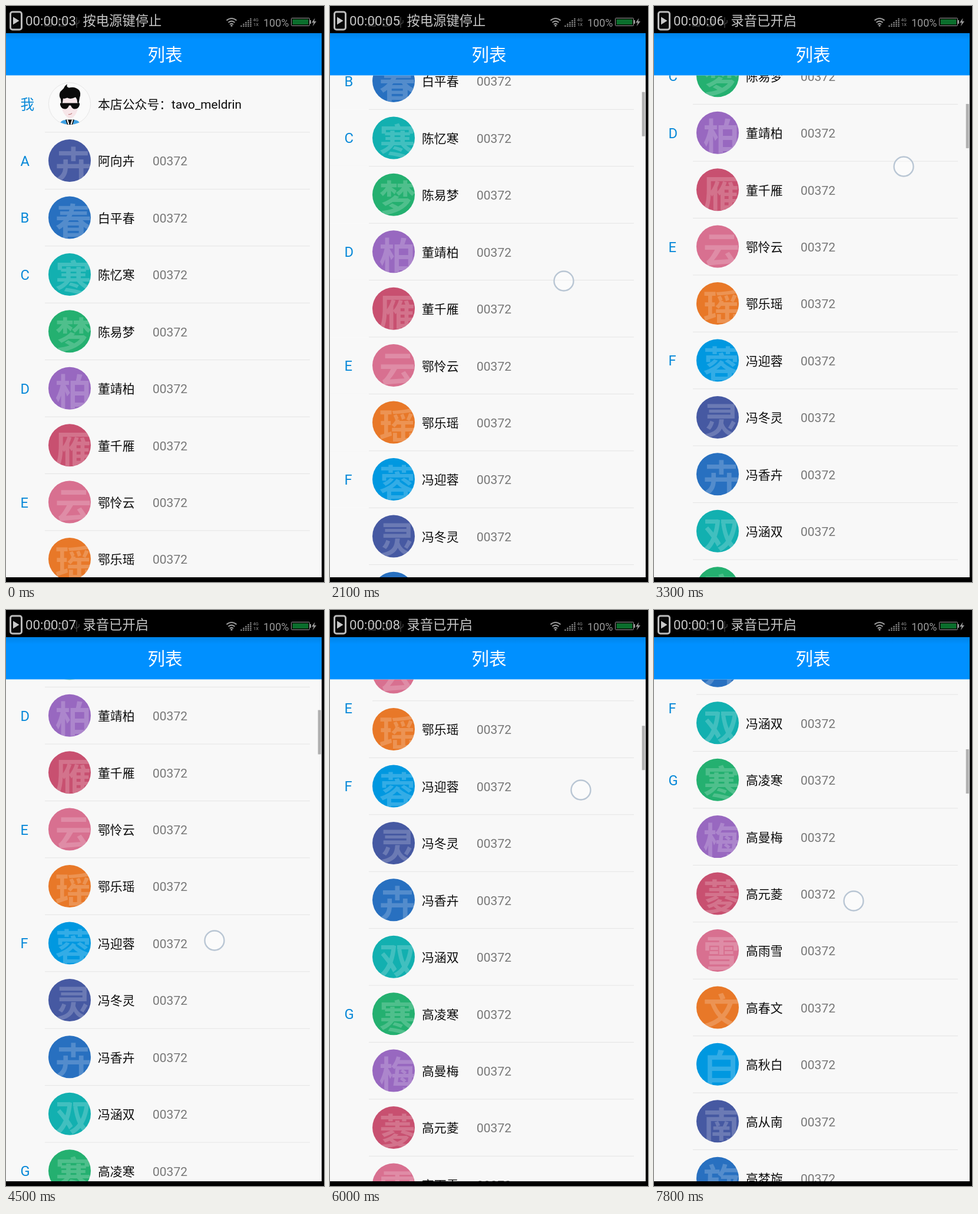
An HTML page for the animation above (8 s loop, 540 px wide and 976 px high).

```html
<!DOCTYPE html>
<html lang="zh-CN">
<head>
<meta charset="utf-8">
<title>列表</title>
<style>
  html, body { margin: 0; width: 100%; height: 100%; overflow: hidden; background: #000; }
  svg { display: block; width: 100vw; height: 100vh; }
  text { font-family: Roboto, "Noto Sans CJK SC", "Noto Sans CJK", sans-serif; white-space: pre; }
</style>
</head>
<body>
<svg id="stage" viewBox="0 0 540 976">
  <defs>
    <clipPath id="list"><rect y="117.5" width="536" height="850.5"/></clipPath>
    <clipPath id="disc"><circle r="36"/></clipPath>
    <linearGradient id="shade" x2="0" y2="1">
      <stop stop-color="#0084e8"/>
      <stop offset="1" stop-color="#0090ff"/>
    </linearGradient>
  </defs>
  <rect width="540" height="976" fill="#000"/>
  <rect y="117" width="536" height="851" fill="#f8f8f8"/>
  <g clip-path="url(#list)">
    <g id="rows"></g>
    <g id="letters"></g>
    <rect id="thumb" x="529.7" width="5.3" height="75" fill="#b2b2b2"/>
    <circle id="touch" r="16.5" fill="#fff" fill-opacity=".35" stroke="#b9c6d4" stroke-width="2.4"/>
  </g>
  <rect y="46" width="536" height="71.5" fill="#0090ff"/>
  <rect y="46" width="536" height="12" fill="url(#shade)"/>
  <text x="270" y="93" font-size="29.6" fill="#fff" text-anchor="middle">列表</text>

  <!-- dim icons behind the recorder label -->
  <g fill="none" stroke="#3c3c3c" stroke-width="1.5">
    <path d="M120 19V37M116 25v4l4 3M124 24v4l-4 3"/>
    <rect x="66" y="23" width="11" height="11"/>
    <rect x="90" y="23" width="11" height="11"/>
  </g>
  <!-- recorder -->
  <rect x="7.5" y="10" width="19" height="30" rx="3.5" fill="#080808" stroke="#bcbcbc" stroke-width="3"/>
  <path d="M12 18.5L22.5 25L12 31.5Z" fill="#c8c8c8"/>
  <g font-size="22.3" fill="#c6c6c6">
    <text id="clock" x="33" y="33"></text>
    <text id="hint" x="130.5" y="32.5"></text>
  </g>
  <!-- phone status -->
  <g fill="none" stroke="#9a9a9a" stroke-width="2">
    <path d="M374.5 24.5Q383 17.5 391.5 24.5M377.5 28Q383 23.3 388.5 28M380 31.2Q383 28.6 386 31.2"/>
    <path id="bars" stroke-width="2.2"/>
  </g>
  <circle cx="383" cy="33.3" r="1.6" fill="#9a9a9a"/>
  <g fill="#9a9a9a">
    <text x="419.5" y="25.5" font-size="7.5">4G</text>
    <text x="420" y="34" font-size="7.5">1X</text>
    <text x="437" y="34.5" font-size="18">100%</text>
    <path d="M516 24h2v6h-2zM524.5 20.5L519 28.2h3.6L520.6 34.5L527 26h-3.6z"/>
  </g>
  <rect x="484.5" y="20.5" width="31" height="13" rx="1" fill="#000" stroke="#9a9a9a"/>
  <rect x="486.5" y="22.5" width="27" height="9" fill="#0a6e2c"/>
</svg>
<script>
const LOOP = 8000, STEP = 300, ROW = 96.43, MID = 166;
const PHONE = "00372";
const TINTS = ["#4659a2", "#2870c0", "#12b0b0", "#24b070", "#9868c0", "#c85070", "#d87090", "#e87828", "#0098e0"];
const NAMES = ("阿向卉 白平春 陈忆寒 陈易梦 董靖柏 董千雁 鄂怜云 鄂乐瑶 冯迎蓉 冯冬灵 " +
  "冯香卉 冯涵双 高凌寒 高曼梅 高元菱 高雨雪 高春文 高秋白 高从南 高梦旋").split(" ");
// index letter and its first and last row
const GROUPS = [["我", 0, 0], ["A", 1, 1], ["B", 2, 2], ["C", 3, 4], ["D", 5, 6], ["E", 7, 8], ["F", 9, 12], ["G", 13, 20]];

const SCROLL = [[0, 0], [300, 8], [600, 36], [900, 75], [2100, 231.5], [3300, 433], [3600, 469],
  [4500, 469], [6000, 735], [6600, 848], [6900, 860], [7800, 1131.5]];
// each drag: time, x, y
const DRAGS = [
  [[300, 344, 694], [900, 362, 626], [2100, 397, 466], [3300, 424, 272], [3600, 429, 237]],
  [[4500, 354, 560], [6000, 426, 305], [6600, 446, 196]],
  [[6900, 300, 764], [7800, 339, 493]]
];

const $ = id => document.getElementById(id);

function add(parent, tag, attrs, text) {
  const el = document.createElementNS("http://www.w3.org/2000/svg", tag);
  for (const key in attrs) el.setAttribute(key, attrs[key]);
  if (text) el.textContent = text;
  parent.appendChild(el);
  return el;
}

function lerpKeys(keys, t, col = 1) {
  let i = 0;
  while (i < keys.length - 2 && t > keys[i + 1][0]) i++;
  const a = keys[i], b = keys[i + 1];
  const u = Math.min(1, Math.max(0, (t - a[0]) / (b[0] - a[0])));
  return a[col] + (b[col] - a[col]) * u;
}

function drawPortrait(g) {
  const shape = (d, fill) => add(g, "path", { d, fill });
  add(g, "circle", { r: 35.6, fill: "#fafafa", stroke: "#e6e6e6" });
  // suit, shirt and tie
  shape("M-15.5 32Q-14 28 -7 27.5H8Q15 28 16.5 32Q0 39 -15.5 32Z", "#3ca0e4");
  shape("M-7 27H8L5 35.5H-4Z", "#111");
  add(g, "path", { d: "M-4 27L-1.5 35M5 27L2.5 35", stroke: "#fff", "stroke-width": 2 });
  // head
  shape("M-13 -9H14V6Q13 17 6 23Q1 26 -4 23Q-12 17 -13 6Z", "#f7e6e9");
  shape("M-14 2L-15 -8Q-19 -13 -16 -20Q-12 -24 -10 -26Q-8 -31 -4 -33Q-6 -28 -1 -27Q9 -30 16 -23" +
    "Q20 -18 17 -10L15 2L13 -3Q13 -8 10 -11Q2 -7 -4 -10Q-9 -8 -11 -9L-12 -2Z", "#0b0b0b");
  shape("M-16 -1H17V2Q15 9 9 9Q4 9 2 3H-1Q-3 9 -8 9Q-14 9 -16 2Z", "#0b0b0b");
  add(g, "path", { d: "M-2 18Q2 18.5 4 16", fill: "none", stroke: "#b77", "stroke-width": 1.1 });
}

function drawRow(i) {
  const g = add($("rows"), "g", { transform: `translate(0 ${MID + i * ROW})` });
  const face = add(g, "g", { transform: "translate(108 -.4)" });
  const name = i ? NAMES[i - 1] : "本店公众号：tavo_meldrin";
  if (i) {
    add(face, "circle", { r: 36, fill: TINTS[(i - 1) % TINTS.length] });
    const clip = add(face, "g", { "clip-path": "url(#disc)" });
    add(clip, "text", { x: 6.5, y: 29.5, "font-size": 62, "font-weight": 700, fill: "#fff", "fill-opacity": .2, "text-anchor": "middle" }, name[2]);
    add(g, "text", { x: 249, y: 8, "font-size": 21, fill: "#777" }, PHONE);
  } else drawPortrait(face);
  add(g, "text", { x: 156, y: 8, "font-size": 20.85, fill: "#0c0c0c" }, name);
  add(g, "rect", { x: 66, y: 47.4, width: 450, height: 1, fill: "#e4e4e4" });
}

for (let i = 0; i <= NAMES.length; i++) drawRow(i);

const letters = GROUPS.map(([label, first, last]) => {
  const g = add($("letters"), "g", {});
  add(g, "rect", { y: -48, width: 66, height: 95, fill: "#f8f8f8" });
  const cover = add(g, "rect", { x: 66, y: -48, width: 6, height: 95, fill: "#f8f8f8" });
  add(g, "text", { x: 24.5, y: 8.6, "font-size": 23.7, fill: "#0788d8" }, label);
  return { g, cover, first, last };
});

$("bars").setAttribute("d", [0, 1, 2, 3, 4].map(i => `M${399.5 + i * 4} 35v${-3 - i * 3}`).join(""));
$("bars").setAttribute("stroke-dasharray", "2 1");

function render(time) {
  const t = Math.floor(time % LOOP / STEP) * STEP;
  const scroll = lerpKeys(SCROLL, t);
  $("rows").setAttribute("transform", `translate(0 ${-scroll})`);

  // a group's letter stays at the top until its last row pushes it out
  for (const { g, cover, first, last } of letters) {
    const natural = MID + first * ROW - scroll;
    const y = Math.min(Math.max(natural, MID), MID + last * ROW - scroll);
    g.setAttribute("transform", `translate(0 ${y})`);
    cover.setAttribute("visibility", y > natural ? "visible" : "hidden");
  }

  $("thumb").setAttribute("y", 122.5 + scroll * .1003);
  $("thumb").setAttribute("visibility", scroll ? "visible" : "hidden");

  const drag = DRAGS.find(d => t >= d[0][0] && t <= d[d.length - 1][0]);
  $("touch").setAttribute("visibility", drag ? "visible" : "hidden");
  if (drag) {
    $("touch").setAttribute("cx", lerpKeys(drag, t, 1));
    $("touch").setAttribute("cy", lerpKeys(drag, t, 2));
  }

  const sec = Math.floor(3.3 + t * .00092);
  $("clock").textContent = "00:00:" + String(sec).padStart(2, "0");
  $("hint").textContent = sec < 6 ? "按电源键停止" : "录音已开启";
}

const start = performance.now();
function tick() {
  render(performance.now() - start);
  requestAnimationFrame(tick);
}
tick();
</script>
</body>
</html>
```
